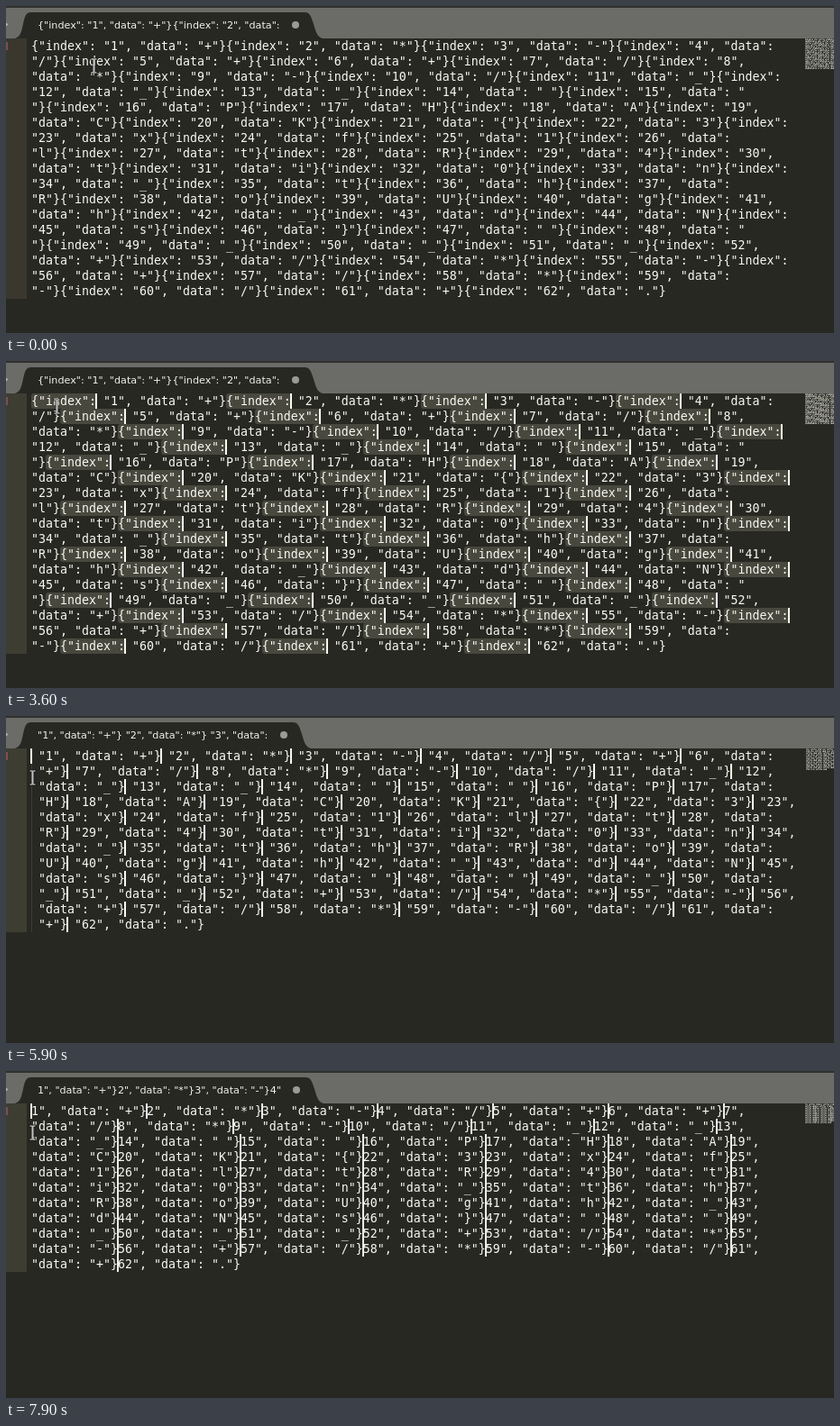
Animation, 918 px wide and 363 px high, one loop 8 s. Source, as an HTML page with a canvas:

```html
<!DOCTYPE html>
<html lang="en">
<head>
<meta charset="utf-8">
<title>Multi-cursor editing</title>
<style>
html, body { margin: 0; width: 100%; height: 100%; overflow: hidden; background: #272822; }
#stage { position: absolute; left: 0; top: 0; width: 918px; height: 363px; overflow: hidden; background: #272822; }
#stage * { position: absolute; }
.page, .layer { left: 0; top: 0; width: 918px; height: 363px; }
.bar { background: #6b6c68; }
.edge { background: #30302d; }
.gutter { background: #3e3d32; }
.number { background: #7b524c; }
.guide { background: #3b3b34; }
.line { white-space: pre; color: #f8f8f2; font: 13.29px/17px "DejaVu Sans Mono", monospace; }
.title { white-space: pre; color: #f2f2ee; font: 11.2px/15px "DejaVu Sans", sans-serif; }
.dot { border-radius: 50%; background: #9a9b96; }
.pick { background: #49483e; border-radius: 3px; }
.caret { background: #f8f8f0; }
svg { left: 0; top: 0; overflow: visible; }
</style>
</head>
<body>
<div id="stage"></div>
<script>
const LOOP = 8000, COL = 8, ROW = 17, LEFT = 28, TOP = 36, COLUMNS = 106, MAP = 886;
const KEY = '{"index":';
const DATA = '+*-/++/*-/___  PHACK{3xf1ltR4ti0n_thRoUgh_dNs}  ___+/*-+/*-/+.';
const stage = document.getElementById('stage');

function box(parent, cls, x, y, w, h, text) {
  const el = document.createElement('div');
  el.className = cls;
  el.style.left = x + 'px';
  el.style.top = y + 'px';
  if (w !== undefined) { el.style.width = w + 'px'; el.style.height = h + 'px'; }
  if (text !== undefined) el.textContent = text;
  parent.append(el);
  return el;
}
const layer = parent => box(parent, 'layer', 0, 0);

function svg(parent, markup) {
  parent.insertAdjacentHTML('beforeend', `<svg width="918" height="363">${markup}</svg>`);
  return parent.lastElementChild;
}

// Hard steps from a table of [time, value].
function steps(el, prop, table) {
  const rows = table[0][0] ? [[0, table[0][1]], ...table] : table;
  const frames = rows.map(([t, v]) => ({ offset: t / LOOP, [prop]: v, easing: 'step-end' }));
  frames.push({ offset: 1, [prop]: rows[rows.length - 1][1] });
  el.animate(frames, { duration: LOOP, iterations: Infinity });
}

function show(el, from, to) {
  const table = [[from, 1]];
  if (from) table.unshift([0, 0]);
  if (to < LOOP) table.push([to, 0]);
  steps(el, 'opacity', table);
}

// Word wrap; "|" marks a caret and takes no room.
function layout(text) {
  const indent = text.replace('|', '')[0] === ' ' ? 1 : 0;
  const lines = [''], carets = [];
  text.split(' ').forEach((word, i) => {
    const plain = word.replace('|', '');
    let last = lines.length - 1;
    if (i && lines[last].length + 1 + plain.length > COLUMNS) {
      lines.push(' '.repeat(indent));
      last++;
    } else if (i) {
      lines[last] += ' ';
    }
    const mark = word.indexOf('|');
    if (mark >= 0) carets.push([lines[last].length + mark, last]);
    lines[last] += plain;
  });
  return { lines, carets, indent };
}

const caret = (parent, col, row) =>
  box(parent, 'caret', LEFT + col * COL - 1, TOP + row * ROW, 2, ROW);

function tab(page, title, dot) {
  const r = dot + 12;
  svg(page, `<path fill="#272822" d="M10 36C16 34 17 29 19 20C21 11 22 7 28 7H${r - 2}
    C${r + 4} 7 ${r + 5} 11 ${r + 8} 20C${r + 11} 30 ${r + 12} 34 ${r + 18} 36Z"/>`);
  box(page, 'title', 35, 14, undefined, undefined, title);
  box(page, 'dot', dot - 4, 17, 8, 8);
}

function minimap(page, lines) {
  const canvas = document.createElement('canvas');
  canvas.width = 918 - MAP;
  canvas.height = lines.length * 2;
  canvas.style.cssText = `left:${MAP}px;top:${TOP}px`;
  const ctx = canvas.getContext('2d');
  lines.forEach((line, row) => [...line.slice(0, canvas.width)].forEach((ch, col) => {
    if (ch === ' ') return;
    const code = ch.charCodeAt(0);
    for (let k = 0; k < 2; k++) {
      ctx.fillStyle = `rgba(248,248,242,${0.15 + (code * (3 + 4 * k)) % 6 * 0.09})`;
      ctx.fillRect(col, row * 2 + k, 1, 1);
    }
  }));
  page.append(canvas);
}

function makePage({ from, to, prefix, suffix, title, dot, blink }) {
  const page = box(stage, 'page', 0, 0);
  const text = [...DATA].map((ch, i) => `${prefix}${i + 1}${suffix}", "data": "${ch}"}`).join('');
  const { lines, carets, indent } = layout(text);
  tab(page, title, dot);
  const gutter = box(page, 'gutter', 0, TOP, 23, lines.length * ROW);
  box(page, 'number', 0, 40, 2, 9);
  if (indent) box(page, 'guide', LEFT, TOP + ROW, 1, (lines.length - 1) * ROW);
  const picks = layer(page);
  minimap(page, lines);
  lines.forEach((line, row) => box(page, 'line', LEFT, TOP + row * ROW, undefined, undefined, line));
  const marks = layer(page);
  carets.forEach(([col, row]) => caret(marks, col, row));
  steps(marks, 'opacity', blink);
  show(page, from, to);
  return { page, gutter, picks, carets, lines };
}

box(stage, 'bar', 0, 0, 918, TOP);
box(stage, 'edge', 0, 0, 918, 2);
svg(stage, '<path d="M0 18.5L2.5 20.5L0 22.5Z" fill="#b4b5b0"/>');

const first = makePage({
  from: 0, to: 5900, prefix: KEY + '| "', suffix: '', dot: 321,
  title: '{"index": "1", "data": "+"}{"index": "2", "data":',
  blink: [[0, 0], [3600, 1], [3900, .75], [4000, .5], [4100, .25], [4200, 0],
    [4500, .25], [4600, .5], [4700, .75], [4800, 1], [5200, .67], [5300, .33], [5400, 0]]
});
makePage({
  from: 5900, to: 6700, prefix: '| "', suffix: '', dot: 308,
  title: '"1", "data": "+"} "2", "data": "*"} "3", "data":',
  blink: [[0, 1], [6300, 0]]
});
makePage({
  from: 6700, to: 7500, prefix: '|"', suffix: '', dot: 318,
  title: '"1", "data": "+"}"2", "data": "*"}"3", "data": "-"',
  blink: [[0, 1], [7100, .65], [7200, .3], [7300, 0]]
});
makePage({
  from: 7500, to: LOOP, prefix: '|', suffix: '', dot: 322,
  title: '1", "data": "+"}2", "data": "*"}3", "data": "-"}4"',
  blink: [[0, 1], [7800, .98], [7900, .95]]
});

steps(first.gutter, 'backgroundColor', [[0, '#3a372f'], [900, '#3e3d32']]);

// Every match selected at once.
const matches = layer(first.picks);
first.carets.forEach(([col, row]) => {
  const start = col - KEY.length;
  box(matches, 'pick', LEFT + start * COL, TOP + row * ROW, KEY.length * COL, ROW);
  box(matches, 'pick', MAP + start, TOP + row * 2, KEY.length, 2);
});
show(matches, 3600, 5900);

// A drag to the left picks the first key.
const drag = [[1200, 95], [1300, 88], [1400, 78], [1500, 66], [1600, 52], [1700, 40], [1800, 28], [1900, 17]];
const dragCols = [[0, KEY.length],
  ...drag.map(([t, x]) => [t, Math.max(0, Math.round((x - LEFT) / COL))])];
const single = layer(first.picks);
const pick = box(single, 'pick', LEFT, TOP, 0, ROW);
const mapPick = box(single, 'pick', MAP, TOP, 0, 2);
for (const [el, left, unit] of [[pick, LEFT, COL], [mapPick, MAP, 1]]) {
  steps(el, 'left', dragCols.map(([t, c]) => [t, left + c * unit + 'px']));
  steps(el, 'width', dragCols.map(([t, c]) => [t, (KEY.length - c) * unit + 'px']));
}
show(single, 1000, 3600);

const dragCaret = caret(first.page, 0, 0);
steps(dragCaret, 'left', dragCols.map(([t, c]) => [t, LEFT + c * COL - 1 + 'px']));
show(dragCaret, 1000, 3600);

const lastRow = first.lines.length - 1;
show(caret(first.page, first.lines[lastRow].length, lastRow), 900, 1000);

const beam = 'M-2.5-7.5H-1Q0-7.5 0-6.5V6.5Q0 7.5-1 7.5H-2.5M2.5-7.5H1Q0-7.5 0-6.5V6.5Q0 7.5 1 7.5H2.5';
const pointer = svg(stage, `<g fill="none" stroke-linecap="square">
  <path d="${beam}" stroke="#111" stroke-width="2.6"/><path d="${beam}" stroke="#fff"/></g>`);
const route = [[0, 97, 66], [100, 98, 62], [200, 100, 57], [400, 100, 55], [500, 99, 52], [600, 99, 49],
  ...drag.map(([t, x]) => [t, x, 48]),
  [2100, 16, 53], [2300, 36, 52], [2400, 54, 50], [3600, 56, 50],
  [4500, 55, 52], [4600, 50, 58], [4700, 44, 63], [4800, 38, 66], [4900, 32, 68], [5000, 29, 68]];
steps(pointer, 'transform', route.map(([t, x, y]) => [t, `translate(${x + .5}px, ${y + .5}px)`]));
</script>
</body>
</html>
```
